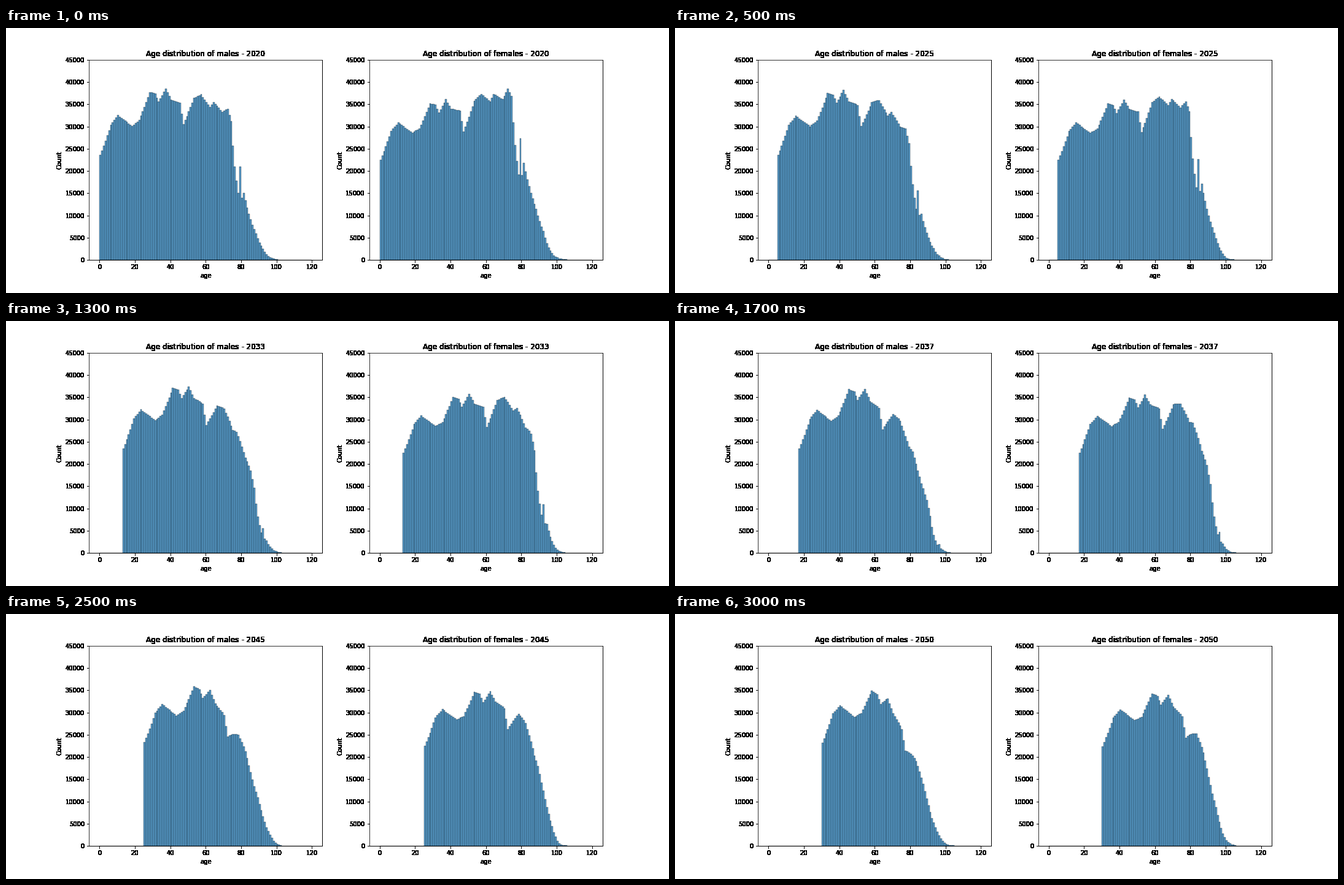
Animation of 1080x432 px, one loop 3100 ms. Source, as a matplotlib script:

```python
import numpy as np
import matplotlib.pyplot as plt
from matplotlib.animation import FuncAnimation
from matplotlib.colors import to_rgba

plt.rcParams.update({"font.family": "DejaVu Sans", "font.size": 10})

START_YEAR, FRAMES, INTERVAL = 2020, 31, 100
AGES = np.arange(120)

# Turning points of the first year's curves: age, males, females (hundreds).
KEY_POINTS = np.array([
    (0, 236, 225), (6, 304, 290), (10, 325, 309), (18, 301, 286),
    (22, 314, 295), (28, 377, 352), (31, 374, 349), (33, 356, 331),
    (37, 385, 361), (40, 360, 340), (45, 353, 335), (47, 305, 289),
    (53, 364, 358), (57, 372, 373), (62, 343, 356), (64, 355, 373),
    (69, 333, 361), (72, 340, 385), (74, 312, 369), (76, 210, 258),
    (78, 150, 192), (79, 210, 273), (80, 140, 191), (81, 151, 218),
    (84, 104, 165), (88, 60, 115), (92, 25, 65), (96, 6, 21), (105, .05, .8),
]).T


def first_counts(column):
    log_counts = np.interp(AGES, KEY_POINTS[0], np.log(KEY_POINTS[column]))
    return np.where(AGES <= KEY_POINTS[0, -1], 100 * np.exp(log_counts), 0)


def cumulative_hazard(level, slope, bend):
    """Gompertz mortality with a slight bend, flat at extreme ages."""
    x = AGES - 74
    yearly = np.minimum(np.exp(level + slope * x + bend * x**2), 0.45)
    return np.cumsum(yearly) - yearly


def project(first, hazard, years):
    """Age every cohort by the given years and thin it by mortality."""
    size = len(AGES) - years
    survivors = first[:size] * np.exp(hazard[:size] - hazard[years:])
    return np.concatenate([np.zeros(years), survivors])


def solid_black(image, dpi):
    """Turn soft edges into full black."""
    hard = np.zeros_like(image)
    hard[..., 3] = image[..., 3] > 0
    return hard, 0, 0


class Panel:
    def __init__(self, ax, name, first, hazard):
        self.name, self.first, self.hazard = name, first, hazard
        self.bars = ax.bar(AGES, np.zeros(len(AGES)), width=1, align="edge",
                           facecolor=to_rgba("C0", 0.75), edgecolor="black",
                           linewidth=0.288)
        ax.set(xlim=(-6, 126), ylim=(0, 45000), xlabel="age", ylabel="Count",
               xticks=range(0, 121, 20), yticks=range(0, 45001, 5000))
        ax.spines[["left", "top"]].set_linewidth(0.8)
        ax.spines[["right", "bottom"]].set_linewidth(1)
        self.title = ax.set_title("", fontsize=12)
        hardened = [ax.xaxis.label, ax.yaxis.label, self.title]
        for axis in (ax.xaxis, ax.yaxis):
            hardened += [*axis.get_ticklabels(), *axis.get_ticklines()]
        for artist in hardened:
            artist.set_agg_filter(solid_black)

    def show(self, years):
        for bar, count in zip(self.bars, project(self.first, self.hazard, years)):
            bar.set_height(count)
        self.title.set_text(f"Age distribution of {self.name} - {START_YEAR + years}")


fig, axes = plt.subplots(1, 2, figsize=(15, 6), dpi=72, facecolor="white")
fig.subplots_adjust(left=0.125, right=0.9, bottom=0.125, top=0.88, wspace=0.2)
panels = [
    Panel(axes[0], "males", first_counts(1), cumulative_hazard(-3.57, 0.102, 0.0006)),
    Panel(axes[1], "females", first_counts(2), cumulative_hazard(-4.19, 0.12, 0.0007)),
]


def update(frame):
    for panel in panels:
        panel.show(frame)


animation = FuncAnimation(fig, update, frames=FRAMES, init_func=lambda: update(0),
                          interval=INTERVAL, repeat=True, repeat_delay=0)
plt.show()
```
